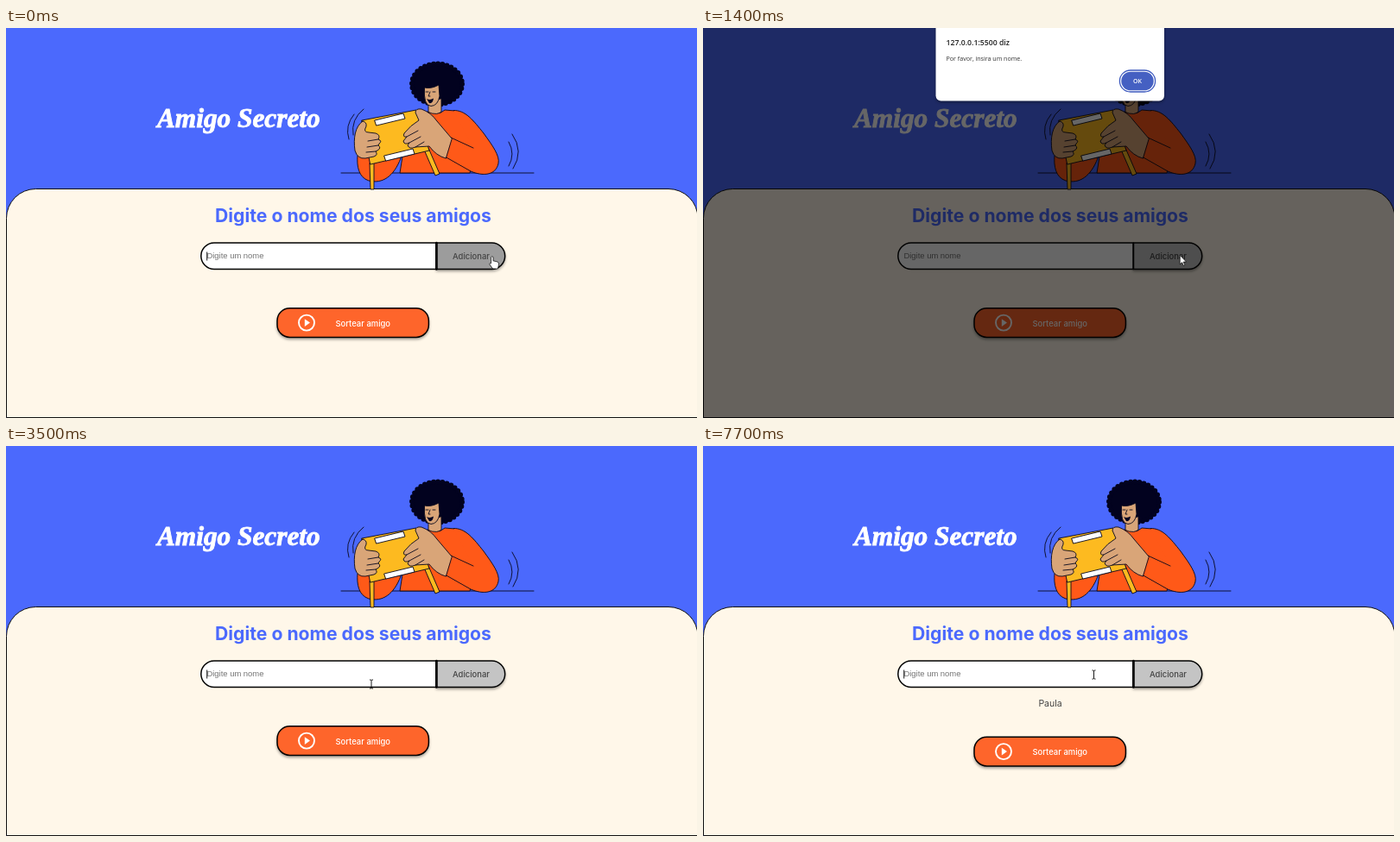
An HTML page that plays this animation: 800 px wide and 452 px high, repeating every 8000 ms.

```html
<!DOCTYPE html>
<html lang="pt-BR">
<head>
<meta charset="utf-8">
<title>Amigo Secreto</title>
<style>
  html, body { margin: 0; width: 100%; height: 100%; overflow: hidden; background: #4b69fd; }
  svg { display: block; width: 800px; height: 452px; }
  text { font: 500 9.45px Inter, sans-serif; font-optical-sizing: none; white-space: pre; }
  .mid { text-anchor: middle; }
  .title { font: italic 700 31.3px "Liberation Serif", serif; fill: #fff; stroke: #fff; stroke-width: .9; }
  .heading { font-size: 21.2px; font-weight: 700; fill: #4b69fd; }
  .field { font: 9.45px "Liberation Sans", sans-serif; }
  .item { font-size: 10.5px; font-weight: 400; fill: #444; }
  .origin { font: 600 8.7px "Open Sans", sans-serif; fill: #1f1f1f; }
  .message { font: 7.1px "Open Sans", sans-serif; fill: #333; }
  .ok { font: 600 7px "Open Sans", sans-serif; fill: #fff; }
  .box { stroke: #000; stroke-width: 1.5; }
  .shadow { filter: drop-shadow(0 2px 1.5px rgba(0, 0, 0, .35)); }
  .art { stroke: #08081c; stroke-width: .9; stroke-linejoin: round; stroke-linecap: round; fill: none; }
  .art .orange { fill: #ff5918; }
  .art .yellow { fill: #fdba20; }
  .art .skin { fill: #d9a578; }
  .art .white { fill: #fff; }
  .art .hair { fill: #02021f; stroke: none; }
  .art .curls { stroke: #02021f; stroke-width: 6; stroke-dasharray: 0 5.2; }
</style>
</head>
<body>
<svg viewBox="0 0 800 452">
  <rect width="800" height="452" fill="#4b69fd"/>
  <text class="title" x="175" y="115.2">Amigo Secreto</text>

  <path d="M.5 451.5V220.5A34 34 0 0 1 34.5 186.5H767A34 34 0 0 1 801 220.5V451.5Z" fill="#fff7e9" stroke="#111"/>

  <g class="art">
    <path d="M388 168H611M403 100Q392 113 397 129M414 94Q399 106 402 124M582 132Q590 146 582 160M586 123Q600 143 587 163"/>
    <!-- head -->
    <ellipse class="hair" cx="499" cy="65" rx="30" ry="25"/>
    <ellipse class="curls" cx="499" cy="65" rx="29" ry="23.5"/>
    <path class="skin" d="M489 86V98Q497 104 504 97V82Z"/>
    <path class="skin" d="M484.5 69Q483 90 492 90.5Q500 90 502 79L501 66Q492 71 484.5 69Z"/>
    <path d="M486 74h3M494 74h3M491 74l-2 5h2"/>
    <path class="hair" d="M487 82Q491 84 495 81.5Q494 88 490 87Z"/>
    <!-- body and arms -->
    <path class="orange" d="M488 97Q499 103 508 95Q528 95 541 108L548 125 537 168H456L462 130Z"/>
    <path class="orange" d="M407 148C406 160 408 173 420 177C436 181 449 172 457 151Z"/>
    <path class="orange" d="M518 95.5C532 95 541 107 553 122C563 136 572 148 570 157C567 171 552 172 538 166L508 149 515 127 541 139"/>
    <!-- table -->
    <path class="yellow" d="M421 157L422 187H426V156ZM484 141L497 171 502 169 489 139Z"/>
    <path class="yellow" d="M412 107L475 95 490 142 422 158Z"/>
    <path class="white" d="M427 107L460 99 462 105 429 113ZM438 148L471 140 473 146 440 154Z"/>
    <!-- hands -->
    <path class="skin" d="M413 108C404 114 402 128 404 142Q407 152 416 151L426 149Q431 147 428 143L430 142Q435 139 431 136L432 134Q436 131 431 129Q434 124 428 122L420 121Q413 121 417 114Q418 109 413 108Z"/>
    <path class="skin" d="M516 128L499 108Q492 98 481 94Q474 93 474 98L478 107Q468 113 461 122Q459 127 464 126L460 131Q461 136 467 133L465 136Q467 141 474 138L490 137Q498 148 509 151Z"/>
    <path d="M428 143L417 144M431 136L418 138M431 129L419 131M464 126L477 119M467 133L480 126M474 138L484 132"/>
  </g>

  <text class="heading mid" x="402" y="225.4">Digite o nome dos seus amigos</text>

  <path id="add" class="box shadow" d="M498.5 249H562.5A15 15 0 0 1 562.5 279.4H498.5Z"/>
  <text class="mid" x="538.5" y="268" fill="#444">Adicionar</text>
  <path class="box" d="M498 249V279.4H241A15 15 0 0 1 241 249Z" fill="#fff"/>
  <path id="focus" d="M498.4 249V279.4" stroke="#000" stroke-width="2.6" stroke-linecap="round"/>
  <text id="value" class="field" x="232.4" y="267.4"></text>
  <path id="caret" d="M0 259.5V269.5" stroke="#000" stroke-width=".9"/>

  <text id="item" class="item mid" x="402" y="302">Paula</text>
  <g id="draw">
    <rect class="box shadow" x="314" y="324.8" width="175.4" height="33.6" rx="14.5" fill="#fe652b"/>
    <circle cx="348" cy="341.6" r="9" fill="none" stroke="#fff" stroke-width="1.9"/>
    <path d="M345.8 337.3V345.9L352 341.6Z" fill="#fff"/>
    <text x="381.5" y="345.5" fill="#fff">Sortear amigo</text>
  </g>

  <rect id="dim" width="800" height="452" opacity=".6"/>

  <g id="dialog">
    <path class="shadow" d="M269.5 -8H534V78.5A6 6 0 0 1 528 84.5H275.5A6 6 0 0 1 269.5 78.5Z" fill="#fff"/>
    <text class="origin" x="281.5" y="20.3">127.0.0.1:5500 diz</text>
    <text class="message" x="281.5" y="38">Por favor, insira um nome.</text>
    <rect id="ring" x="482.4" y="49" width="41.2" height="25" rx="12.5" fill="none" stroke="#3f5bbf" stroke-width="1.3"/>
    <rect id="okButton" x="484.3" y="50.7" width="37.4" height="21.6" rx="10.8"/>
    <text class="ok mid" x="503" y="64.2">OK</text>
  </g>

  <g id="cursor" stroke="#000" stroke-width=".7" stroke-linejoin="round" fill="#fff">
    <path id="hand" d="M-3.4-6.5Q-2.2-8-1-6.5V-2.2L4-1Q6-.4 5.6 2L4.4 7H-1.4L-5.2 1.8Q-5.4 0-3.4 .8Z"/>
    <path id="arrow" d="M0 0V10.5L2.4 8.3 4 12 5.6 11.3 4 7.7H7.3Z"/>
    <path id="beam" fill="none" stroke-width=".9" d="M-2-5H-.5L0-4.5 .5-5H2M0-4.5V4.5M-2 5H-.5L0 4.5 .5 5H2"/>
  </g>
</svg>
<script>
const LOOP = 8000, STEP = 100;
const el = Object.fromEntries([...document.querySelectorAll('[id]')].map(e => [e.id, e]));

// time, x, y of the pointer
const path = [
  [0, 565, 272], [200, 554, 270.5], [1300, 554, 270.5], [2200, 501.7, 62.5],
  [2600, 501.7, 62.5], [3100, 423, 276], [6000, 423, 276], [6100, 446.5, 268.5],
  [6700, 553, 268], [7200, 553, 268], [7500, 452.5, 265], [8000, 452.5, 265]
];
const name = 'Paula';
const keyTimes = [4700, 4800, 5100, 5400, 5500];
const caretSpans = [[0, 400], [3500, 4000], [4500, 6100], [6600, 6900], [7700, 8000]];
const focusSpans = [[0, 400], [3500, 6900], [7700, 8000]];

const within = (t, spans) => spans.some(([from, to]) => t >= from && t < to);
const show = (e, on) => e.setAttribute('visibility', on ? 'visible' : 'hidden');
const smooth = p => p * p * (3 - 2 * p);

function pointerAt(t) {
  const i = path.findIndex(key => key[0] > t);
  const [t0, x0, y0] = path[i - 1], [t1, x1, y1] = path[i];
  const p = smooth((t - t0) / (t1 - t0));
  return [x0 + (x1 - x0) * p, y0 + (y1 - y0) * p];
}

function dialogAt(t) {
  if (t < 700 || t >= 2500) return [0, 0];
  if (t >= 2300) return t < 2400 ? [1, -1.5] : [.45, -4];
  const p = Math.min(1, (t - 600) / 300);
  return [p, -4 * (1 - p)];
}

function render(t) {
  const [x, y] = pointerAt(t);
  const kind = t < 1400 ? 'hand' : t < 2900 ? 'arrow' : x > 498 ? 'hand' : 'beam';
  for (const k of ['hand', 'arrow', 'beam']) show(el[k], k === kind);
  el.cursor.setAttribute('transform', `translate(${x} ${y})`);
  el.add.setAttribute('fill', kind === 'hand' ? '#9c9c9c' : '#c4c4c4');

  const added = t >= 7000;
  const typed = added ? '' : name.slice(0, keyTimes.filter(k => t >= k).length);
  el.value.textContent = typed || 'Digite um nome';
  el.value.setAttribute('fill', typed ? '#000' : '#757575');
  const width = typed ? el.value.getComputedTextLength() : 0;
  el.caret.setAttribute('transform', `translate(${232.7 + width} 0)`);
  show(el.caret, within(t, caretSpans));
  show(el.focus, within(t, focusSpans));

  show(el.item, added);
  el.draw.setAttribute('transform', `translate(0 ${added ? 12.5 : 0})`);

  const closing = t >= 2300;
  const [opacity, shift] = dialogAt(t);
  show(el.dim, t >= 600 && !closing);
  el.dialog.setAttribute('opacity', opacity);
  el.dialog.setAttribute('transform', `translate(0 ${shift})`);
  show(el.ring, !closing);
  el.okButton.setAttribute('fill', closing ? '#3350b8' : '#4560c2');
}

const start = performance.now();
function tick() {
  const t = (performance.now() - start) % LOOP;
  render(Math.floor(t / STEP) * STEP);
  requestAnimationFrame(tick);
}
tick();
</script>
</body>
</html>
```
